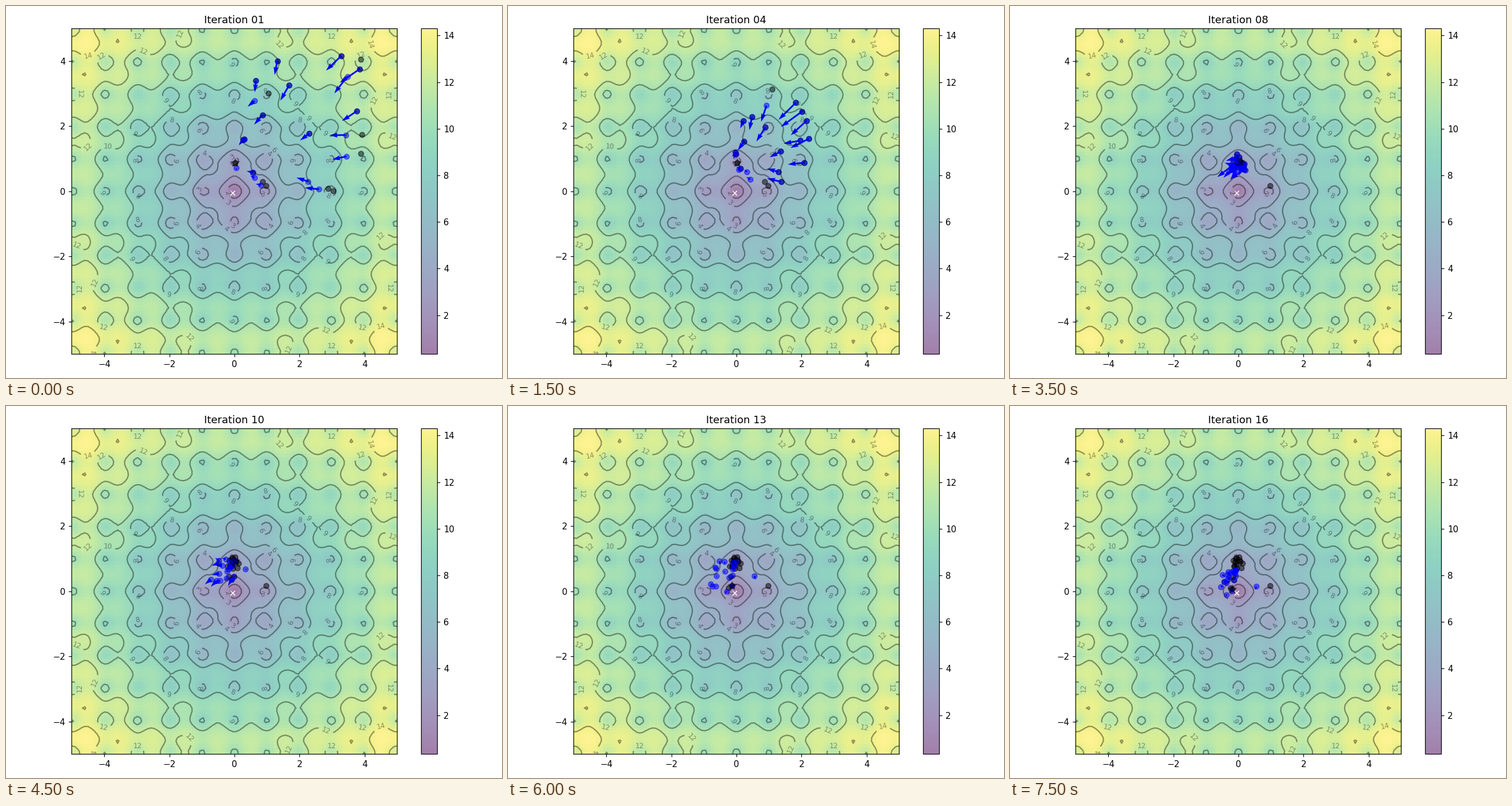
These frames come from a looping animation (864 by 648 pixels, 8 s). A matplotlib script:

```python
import numpy as np
import matplotlib.pyplot as plt
from matplotlib.animation import FuncAnimation

FRAMES, INTERVAL = 16, 500
N, W, C1, C2 = 20, 0.8, 0.1, 0.1


def ackley(x, y):
    bowl = -20 * np.exp(-0.2 * np.sqrt(0.5 * (x**2 + y**2)))
    ripple = -np.exp(0.5 * (np.cos(2 * np.pi * x) + np.cos(2 * np.pi * y)))
    return bowl + ripple + np.e + 20


def swarm(steps):
    """Run the particle swarm and return (X, V, pbest, gbest) per step."""
    rng = np.random.RandomState(100)
    X = rng.rand(2, N) * 5
    V = rng.randn(2, N) * 0.1
    pbest, pobj = X.copy(), ackley(*X)
    gbest = pbest[:, pobj.argmin()].copy()
    states = []
    for _ in range(steps):
        r1, r2 = rng.rand(2)
        V = W * V + C1 * r1 * (pbest - X) + C2 * r2 * (gbest[:, None] - X)
        X = X + V
        obj = ackley(*X)
        better = pobj >= obj
        pbest[:, better] = X[:, better]
        pobj = np.minimum(pobj, obj)
        gbest = pbest[:, pobj.argmin()].copy()
        states.append((X, V, pbest.copy(), gbest))
    return states


# The first step only warms up the swarm.
states = swarm(FRAMES + 1)[1:]

grid = np.linspace(-5, 5, 100)
x, y = np.meshgrid(grid, grid)
z = ackley(x, y)

fig, ax = plt.subplots(figsize=(8, 6), dpi=108)
fig.set_layout_engine("tight")
img = ax.imshow(z, extent=[-5, 5, -5, 5], origin="lower", cmap="viridis", alpha=0.5)
fig.colorbar(img, ax=ax)
ax.plot([grid[49]], [grid[49]], marker="x", markersize=5, color="white")
contours = ax.contour(x, y, z, 10, colors="black", alpha=0.4)
ax.clabel(contours, inline=True, fontsize=8, fmt="%.0f")

X, V, pbest, gbest = states[0]
best_dots = ax.scatter(*pbest, marker="o", color="black", alpha=0.5)
dots = ax.scatter(*X, marker="o", color="blue", alpha=0.5)
arrows = ax.quiver(*X, *V, color="blue", width=0.005,
                   angles="xy", scale_units="xy", scale=1)
star = ax.scatter(*gbest, marker="*", s=100, color="black", alpha=0.4)
ax.set_xlim(-5, 5)
ax.set_ylim(-5, 5)


def draw(i):
    X, V, pbest, gbest = states[i]
    ax.set_title(f"Iteration {i + 1:02d}")
    best_dots.set_offsets(pbest.T)
    dots.set_offsets(X.T)
    arrows.set_offsets(X.T)
    arrows.set_UVC(*V)
    star.set_offsets([gbest])
    return best_dots, dots, arrows, star


anim = FuncAnimation(fig, draw, frames=FRAMES, interval=INTERVAL,
                     repeat=True, repeat_delay=0, blit=False)
plt.show()
```
